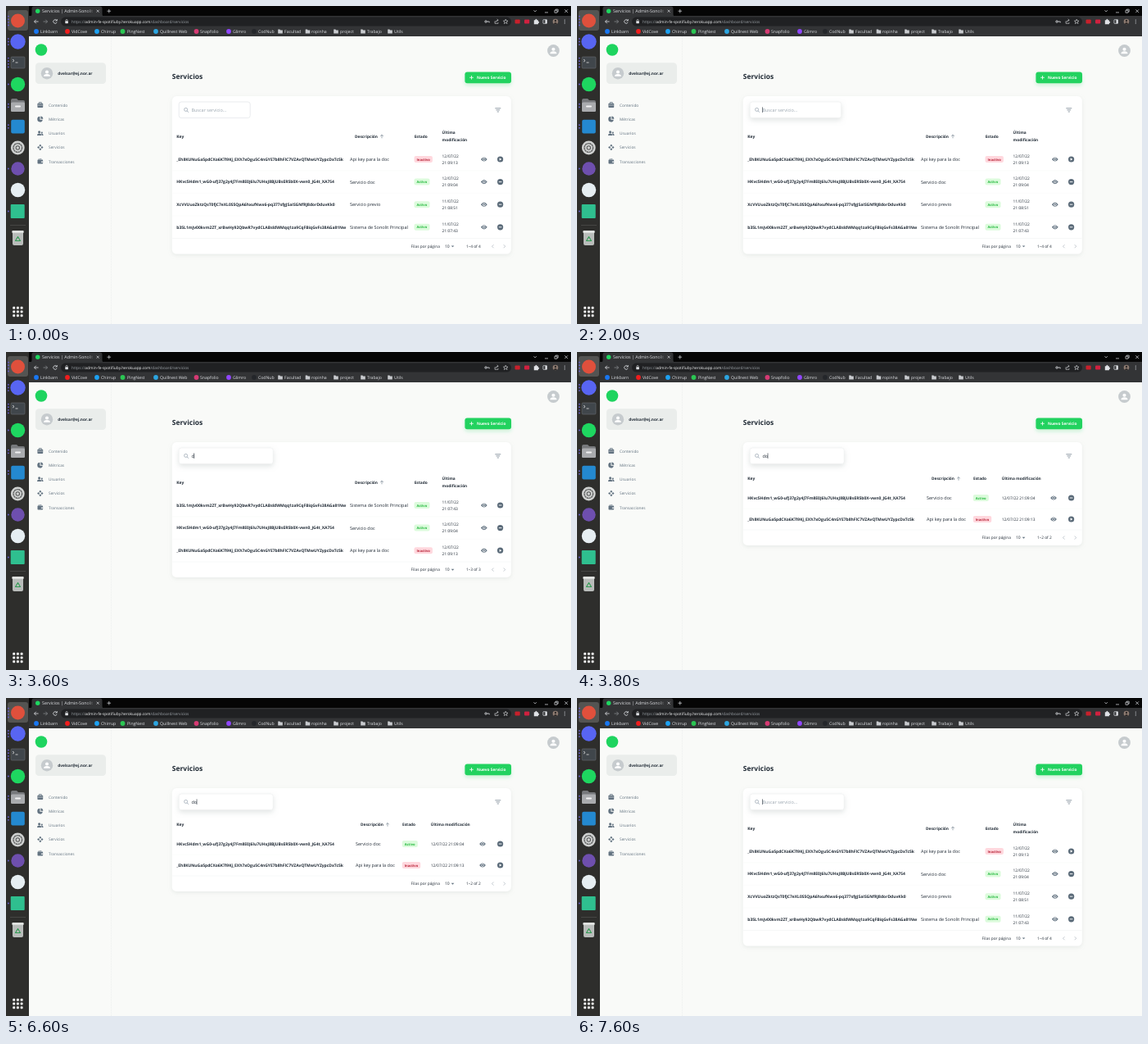
An HTML page for the animation above (8000 ms loop, 690 by 388 pixels).

```html
<!DOCTYPE html>
<html lang="es">
<head>
<meta charset="utf-8">
<title>Servicios</title>
<style>
html, body { margin: 0; width: 100%; height: 100%; overflow: hidden; background: #f9faf8; }
svg { display: block; width: 100vw; height: 100vh; }
text { font-family: "Open Sans", "Noto Sans", sans-serif; text-rendering: geometricPrecision; white-space: pre; }
</style>
</head>
<body>
<svg id="stage" viewBox="0 0 690 388">
  <defs>
    <linearGradient id="tabFade">
      <stop offset="0" stop-color="#333436" stop-opacity="0"/>
      <stop offset="1" stop-color="#333436"/>
    </linearGradient>
    <filter id="cardShadow" x="-10%" y="-15%" width="120%" height="135%">
      <feDropShadow dx="0" dy="1.5" stdDeviation="2.5" flood-color="#919e9b" flood-opacity=".18"/>
    </filter>
    <filter id="fieldShadow" x="-20%" y="-60%" width="140%" height="260%">
      <feDropShadow dx="0" dy="2.5" stdDeviation="3" flood-color="#919e9b" flood-opacity=".28"/>
    </filter>
    <filter id="buttonShadow" x="-20%" y="-60%" width="140%" height="260%">
      <feDropShadow dx="0" dy="2.5" stdDeviation="2.2" flood-color="#1ed45f" flood-opacity=".22"/>
    </filter>
  </defs>
  <g id="fixed"></g>
  <g id="live"></g>
</svg>
<script>
const LOOP = 8000, STEP = 100;
const INK = '#212b36', SOFT = '#637381', PALE = '#919eab', BAR = '#333436', RUNNING = '#6a62d6';

const rect = (x, y, w, h, fill, r = 0, more = '') =>
  `<rect x="${x}" y="${y}" width="${w}" height="${h}" rx="${r}" fill="${fill}" ${more}/>`;
const disc = (x, y, r, fill, more = '') =>
  `<circle cx="${x}" cy="${y}" r="${r}" fill="${fill}" ${more}/>`;
const line = (d, color, w = 0.7, more = '') =>
  `<path d="${d}" fill="none" stroke="${color}" stroke-width="${w}" ${more}/>`;
const shape = (d, fill, more = '') => `<path d="${d}" fill="${fill}" ${more}/>`;
const label = (x, y, size, text, fill = INK, weight = 400) =>
  `<text x="${x}" y="${y}" font-size="${size}" fill="${fill}" font-weight="${weight}">${text}</text>`;
const at = (x, y, body) => `<g transform="translate(${x} ${y})">${body}</g>`;

// Desktop dock
function dots(y, count) {
  let out = '';
  for (let i = 0; i < count; i++) out += disc(2.9, y + (i - (count - 1) / 2) * 3.6, 0.9, RUNNING);
  return out;
}

const gear = () => disc(0, 0, 8.4, '#cfd1d0')
  + disc(0, 0, 5.3, 'none', 'stroke="#5a5c5c" stroke-width="1.3" stroke-dasharray="2.4 .4"')
  + disc(0, 0, 2.2, 'none', 'stroke="#5a5c5c" stroke-width="1.1"');

function dock() {
  let out = rect(0, 0, 28, 388, '#2e2e2c') + rect(2, 5, 25, 25, '#545452', 3);
  out += disc(14.5, 18, 8.5, '#e0503c') + dots(18, 4);
  out += disc(14.5, 43.5, 9.2, '#5865f2') + dots(43.5, 3);
  out += rect(6, 62, 17, 14, '#40464b', 1.2, 'stroke="#686d70" stroke-width=".6"')
    + line('M8 65l2 1.6-2 1.6M11.5 69h3', '#e4e4e4', 0.8) + dots(69, 4);
  out += disc(14.5, 95.5, 8.7, '#1ed760') + dots(95.5, 1);
  out += shape('M6 115q0-2 2-2h5l2 2h6q2 0 2 2v10q0 2-2 2H8q-2 0-2-2z', '#77797c')
    + rect(6, 117.5, 17, 11.5, '#a9abae', 1.6) + rect(11, 121.5, 7, 2, '#f2f2f2', 1) + dots(121.5, 2);
  out += rect(6.2, 138.8, 16.6, 16.6, '#2489d0', 2) + dots(147, 2);
  out += at(14.3, 173, gear());
  out += disc(14.5, 198.5, 8.2, '#6e4fae') + dots(198.5, 1);
  out += disc(14.5, 224.5, 8.7, '#e6eef2');
  out += rect(5.7, 242, 17, 17, '#2fbf8f', 1) + dots(250.5, 1);
  out += line('M5 267.5h19', '#565654', 0.6);
  out += shape('M8 276h13v14q0 2-2 2h-9q-2 0-2-2z', '#b9bcba') + rect(7.3, 274, 14.4, 3, '#dfe1df', 1)
    + line('M14.5 281.5l3 5h-6z', '#2f9a52', 1.1, 'stroke-linejoin="round"');
  for (let i = 0; i < 9; i++) out += rect(8.2 + i % 3 * 4.7, 366.8 + Math.floor(i / 3) * 4.7, 3, 3, '#f0f0f0', 0.9);
  return out;
}

// Browser frame
const folder = x => shape(`M${x - 2.8} 28.6h2.2l.8.9h2.6v4h-5.6z`, '#c8cace');

const bookmarks = [
  [37, 42, 'Linkbarn', '#1877f2'], [75, 80, 'VidCove', '#f01d1d'], [111, 116, 'Chirrup', '#1da1f2'],
  [142.5, 148, 'PingNest', '#2bc653'], [183, 188, 'Quillnest Web', '#2ca5e0'], [232.5, 237, 'Snapfolio', '#d63a73'],
  [272, 277, 'Glimro', '#9146ff'], [303, 308, 'CodNub', '#24262a'], [335, 340, 'Facultad'],
  [368.5, 373, 'ropinha'], [403, 408, 'project'], [436, 441, 'Trabajo'], [469, 474, 'Utils']
];

function browser() {
  const c = '#dfe1e5', dim = '#9aa0a6';
  let out = rect(28, 0, 662, 12.5, '#050505') + rect(28, 12, 662, 25, BAR);
  out += shape('M29 12.5q2.5 0 2.5-2.5V3q0-2.5 2.5-2.5h81q2.5 0 2.5 2.5v7q0 2.5 2.5 2.5z', BAR);
  out += disc(38.7, 6.2, 2.7, '#1ed760') + label(44, 8.1, 5.3, 'Servicios | Admin-Sonolit', c)
    + rect(98, 1, 11, 11, 'url(#tabFade)') + rect(109, 1, 7, 11, BAR);
  out += line('M110.7 4.7l3 3m0-3l-3 3M123.5 6.2h4.6m-2.3-2.3v4.6', c, 0.7);
  out += line('M644.5 5.2l1.7 1.8 1.7-1.8M658 7.9h4M670 5.2h3v3h-3zM671.2 5.2v-1.1h3v3h-1.2M682.3 4.3l3.8 3.8m0-3.8l-3.8 3.8', c, 0.7);
  out += rect(67, 13.6, 550, 11, '#202123', 5.5);
  out += line('M39.6 19h-5m2.2-2.3L34.5 19l2.3 2.3', c, 0.8)
    + line('M45.5 19h5m-2.2-2.3l2.3 2.3-2.3 2.3', '#85888c', 0.8)
    + line('M62 17.7a2.3 2.3 0 1 0 .2 2.1M62.3 16v2h-2', c, 0.8);
  out += rect(72.3, 18.3, 3.6, 2.9, c, 0.4) + line('M73 18.5v-1q0-1.1 1.1-1.1t1.1 1.1v1', c, 0.6);
  out += `<text x="80" y="20.8" font-size="4.8" fill="${dim}">https://<tspan fill="#f1f3f4">admin-fe-spotifiuby.herokuapp.com</tspan>/dashboard/servicios</text>`;
  out += disc(586, 19, 1.2, 'none', `stroke="${c}" stroke-width=".8"`) + line('M587.2 19h3v1.3', c, 0.8);
  out += line('M597 18.3v3h4v-1.3M598 19.8q0-2.3 3-2.5m-1.3-1.4l1.5 1.4-1.5 1.4', c, 0.6);
  out += line('M610.2 16.2l.8 1.9 2 .1-1.6 1.3.6 2-1.8-1.1-1.8 1.1.6-2-1.6-1.3 2-.1z', c, 0.6);
  out += rect(621.5, 16.4, 6.2, 5.2, '#c8202b', 1) + rect(633, 16.4, 6.2, 5.2, '#d0213f', 1);
  out += shape('M644.8 17.3h1.5q0-1.5 1.1-1.5t1.1 1.5h1.4v1.5q1.3 0 1.3 1t-1.3 1.1v1.3h-5.1z', c);
  out += rect(655.9, 16.7, 4.6, 4.6, 'none', 0.4, `stroke="${c}" stroke-width=".7"`) + rect(658.5, 16.7, 2, 4.6, c);
  out += disc(671, 19, 3.3, '#8c7a70') + disc(671, 18, 1.2, '#2e2a29') + shape('M668.8 21.4q2.2-3 4.4 0-2.2 1.6-4.4 0z', '#2e2a29');
  for (let i = -1; i < 2; i++) out += disc(682.3, 19 + i * 2, 0.6, c);
  for (const [ix, tx, name, color] of bookmarks)
    out += (color ? disc(ix, 31, 2.9, color) : folder(ix)) + label(tx, 32.8, 5.15, name, c);
  return out;
}

// Page
const person = (x, y, r) => at(x, y, disc(0, 0, r, '#c6cbce') + disc(0, -r * 0.24, r * 0.28, '#fff')
  + shape(`M${-r * 0.55} ${r * 0.5}q0-${r * 0.4} ${r * 0.55}-${r * 0.4}t${r * 0.55} ${r * 0.4}z`, '#fff'));

const menu = [
  ['Contenido', rect(-3.4, -2, 6.8, 5.2, SOFT, 0.8) + line('M-1.5-2v-1.2h3V-2', SOFT, 0.8) + line('M-3 .2h6', '#fff', 0.5)],
  ['Métricas', shape('M-.4-3.2A3.3 3.3 0 1 0 3 .6H-.4z', SOFT) + shape('M.6-3.5A3.2 3.2 0 0 1 3.5-.4H.6z', SOFT)],
  ['Usuarios', disc(-1.2, -1.5, 1.5, SOFT) + shape('M-3.8 2.8q0-2.6 2.6-2.6t2.6 2.6z', SOFT)
    + disc(2, -0.7, 1.1, SOFT) + shape('M1.9 2.8q0-1.5-.7-2.2 2.6-.4 2.6 2.2z', SOFT)],
  ['Servicios', [0, 90, 180, 270].map(a => shape('M0-3.7l1.5 1.5L0-.7l-1.5-1.5z', SOFT, `transform="rotate(${a})"`)).join('')],
  ['Transacciones', rect(-3.3, -2.2, 6.6, 5, SOFT, 0.8) + line('M-2.5-2.7l4-.6', SOFT, 0.7) + rect(1, -0.4, 2.4, 1.5, '#dfe3e6', 0.5)]
];

function page() {
  let out = rect(28, 37, 662, 351, '#f9faf8') + line('M128.5 37v351', '#e0e4e4', 0.5, 'stroke-dasharray="1 1"');
  out += disc(43, 53.5, 7.3, '#1ed45f') + person(668.5, 54.5, 7.4);
  out += rect(36, 69.3, 86, 25.8, '#eaedeb', 4.2) + person(50, 82.2, 7.2)
    + label(63.3, 84, 4.8, 'dvelsar@ej.nor.ar', INK, 700);
  menu.forEach(([name, icon], i) => {
    const y = 120.8 + i * 17.25;
    out += at(41.8, y, icon) + label(52, y + 1.7, 4.8, name, SOFT, 500);
  });
  out += label(202.8, 88.9, 8.5, 'Servicios', INK, 700);
  out += rect(560.4, 80.4, 56.6, 13.8, '#20d25f', 2.9, 'filter="url(#buttonShadow)"')
    + line('M566.2 87.3h4.6m-2.3-2.3v4.6', '#fff', 0.8) + label(575, 89, 4.8, 'Nuevo Servicio', '#fff', 700);
  return out;
}

// Services table
const doc = { key: '_Eh8KUNuGa5pdCXo6K7l9Kj_EXh7xOgu5C4nGYE7b8hFlC7VZAvQTMwUYZypcDxTc5k', about: 'Api key para la doc', day: '12/07/22', hour: '21:09:13', off: true };
const service = { key: 'HKvc5Hdm1_wG0-ufJ37g2y4J7Fm8E0J6lu7UHxJ8BjUBsER5b0X-vwn0_JG4t_XA7S4', about: 'Servicio doc', day: '12/07/22', hour: '21:09:04' };
const early = { key: 'XcVVUuoZktzQsT0fjC7eXL0S5QpA6hxufKwx6-pq377sfgJSaISGNfRJ8dorDduvKk0', about: 'Servicio previo', day: '11/07/22', hour: '21:08:51' };
const main = { key: 'b35L1mJv00kvm2ZT_xrBwHy92QbwR7vydCLABsldWMqq1za9CqFBiqGvFs38AGa81Nw', about: 'Sistema de Sonolit Principal', day: '11/07/22', hour: '21:07:43' };

const wide = { head: 159.2, first: 187, pitch: 27.6, about: 420, title: 426, state: 498.7, date: 532.6, eye: 583.8 };
const slim = { head: 154.6, first: 178, pitch: 26, about: 427, title: 433, state: 484, date: 518.8, eye: 582, oneLine: true };

const eye = (x, y) => at(x, y, shape('M-3.9 0Q0-5.2 3.9 0 0 5.2-3.9 0z', SOFT)
  + disc(0, 0, 1.7, '#fff') + disc(0, 0, 1, SOFT));

const action = (y, off) => at(603.6, y, disc(0, 0, 3.6, '#5b6b79')
  + (off ? shape('M-1-1.7l2.7 1.7-2.7 1.7z', '#fff') : line('M-1.8 0h3.6', '#fff', 0.9)));

function badge(x, y, off) {
  return off
    ? rect(x - 0.2, y - 4, 22.4, 8, '#ffd8de', 2) + label(x + 2.7, y + 1.5, 4.1, 'Inactivo', '#b72136', 700)
    : rect(x - 0.2, y - 4, 19, 8, '#dcfbdc', 2) + label(x + 2.7, y + 1.5, 4.1, 'Activo', '#22b83c', 700);
}

function row(item, y, col) {
  const date = col.oneLine
    ? label(col.date, y + 1.8, 4.85, `${item.day} ${item.hour}`)
    : label(col.date, y - 2.3, 4.85, item.day) + label(col.date, y + 5.8, 4.85, item.hour);
  return label(208.3, y + 1.8, 4.98, item.key, INK, 700) + label(col.about, y + 1.9, 5.5, item.about)
    + badge(col.state, y, item.off) + date + eye(col.eye, y) + action(y, item.off);
}

function table(items, col) {
  const n = items.length, end = col.first + col.pitch * (n - 0.5), foot = end + 9.6, y = col.head + 1.8;
  let out = rect(202.8, 110, 414, end + 19 - 110, '#fff', 5.6, 'filter="url(#cardShadow)"');
  out += label(208.3, y, 4.95, 'Key', INK, 700) + label(col.title, y, 4.8, 'Descripción', INK, 700)
    + line(`M${col.title + 33} ${y + 0.3}v-4.2m-1.8 1.8l1.8-1.8 1.8 1.8`, SOFT, 0.6)
    + label(col.state, y, 4.8, 'Estado', INK, 700);
  out += col.oneLine
    ? label(col.date, y, 4.75, 'Última modificación', INK, 700)
    : label(col.date, y - 4.6, 4.75, 'Última', INK, 700) + label(col.date, y + 3.5, 4.75, 'modificación', INK, 700);
  items.forEach((item, i) => {
    out += row(item, col.first + i * col.pitch, col);
    out += line(`M203 ${end - i * col.pitch}h413.6`, i ? '#f7f8f7' : '#eff1f1', 0.5);
  });
  out += label(494.6, foot + 1.8, 4.8, 'Filas por página', INK, 500) + label(536, foot + 1.8, 5, '10', INK, 500)
    + shape(`M543.7 ${foot - 0.8}h3.6l-1.8 1.9z`, SOFT) + label(562, foot + 1.8, 4.8, `1–${n} of ${n}`, INK, 500)
    + line(`M595.5 ${foot - 2}l-2 2 2 2M607.7 ${foot - 2}l2 2-2 2`, '#a9b2ba', 0.7);
  return out + line('M597.3 124.8h7M598.5 126.9h4.6M599.7 129h2.2', SOFT, 0.7);
}

function field(query, focus, caret) {
  const w = 87 + 28 * focus;
  let out = rect(211.2, 117, w, 19.6, '#fff', 2.8, focus
    ? 'stroke="#e6e9e8" stroke-width=".5" filter="url(#fieldShadow)"' : 'stroke="#dce0e2" stroke-width=".6"');
  out += disc(219.6, 126.4, 2, 'none', `stroke="${PALE}" stroke-width=".7"`) + line('M221.1 127.9l1.9 1.9', PALE, 0.8);
  out += label(226.4, 128.8, 5.5, query || 'Buscar servicio...', query ? INK : '#9aa5af');
  return out + (caret ? rect(226.2 + query.length * 3.25, 123.4, 0.6, 6.6, INK) : '');
}

const views = { '': [[doc, service, early, main], wide], d: [[main, service, doc], wide], do: [[service, doc], slim] };

// Each entry restarts the caret blink
const typing = [[1900, ''], [3600, 'd'], [3800, 'do'], [4000, 'doc'], [6600, 'do'], [6800, 'd'], [7000, '']];

function scene(t) {
  const [since, query] = typing.filter(k => k[0] <= t).pop() || [0, ''];
  const u = Math.min(1, Math.max(0, (t - 1900) / 200));
  const focus = 1 - (1 - u) ** 3;
  const blinkOn = since === 7000 || Math.floor((t - since) / 600) % 2 === 0;
  return table(...views[query.slice(0, 2)]) + field(query, focus, focus > 0 && blinkOn);
}

document.getElementById('fixed').innerHTML = page() + browser() + dock();
const live = document.getElementById('live');
const start = performance.now();
let shown = -1;

function draw() {
  const t = Math.floor((performance.now() - start) % LOOP / STEP) * STEP;
  if (t !== shown) live.innerHTML = scene(t);
  shown = t;
  requestAnimationFrame(draw);
}
draw();
</script>
</body>
</html>
```
